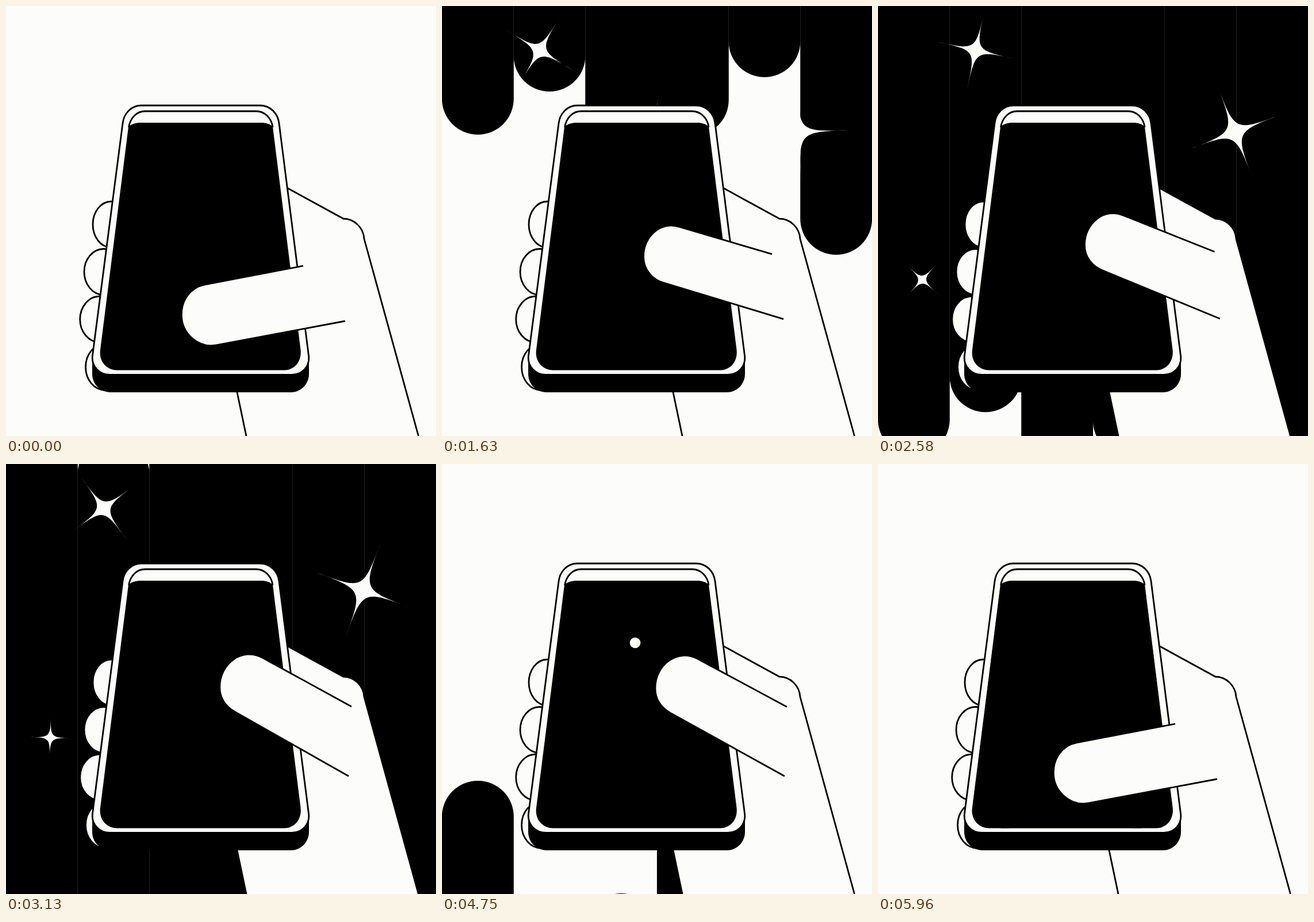
An HTML page for the animation above (6 s loop, 748 by 748 pixels).

```html
<!DOCTYPE html>
<html lang="en">
<head>
<meta charset="utf-8">
<title>Phone in hand</title>
<style>
  html, body { margin: 0; width: 100%; height: 100%; overflow: hidden; background: #fcfcfa; }
  svg { display: block; width: 100%; height: 100%; }
  .line { fill: none; stroke: #000; stroke-width: 2.8; }
  .paper { fill: #fcfcfa; }
  .skin { fill: #fcfcfa; stroke: #000; stroke-width: 2.8; }
</style>
</head>
<body>
<svg viewBox="0 0 748 748">
  <defs>
    <path id="screen" d="M213 210C219 205 226 203 234 203H444C452 203 459 205 464 210L512.5 598C515 620 500 633.5 484 633.5H193C177 633.5 161 620 164 598Z"/>
    <clipPath id="glass"><use href="#screen"/></clipPath>
  </defs>
  <rect class="paper" width="748" height="748"/>
  <g id="bars"></g>
  <g id="stars" class="paper"></g>

  <path class="skin" d="M480 311.5L587 370C606 370 622 386 623 405L720.8 760H420.5L399.5 660"/>
  <g class="skin">
    <ellipse cx="183" cy="380" rx="32" ry="40"/>
    <ellipse cx="170" cy="462.5" rx="34" ry="40"/>
    <ellipse cx="163" cy="545" rx="34.3" ry="40"/>
    <ellipse cx="172" cy="628" rx="33.5" ry="40"/>
  </g>

  <path d="M150 610V640C150 658 164 672 182 672H495C513 672 527 658 527 640V610Z"/>
  <path class="skin" d="M235 173H442C460 173 473 187 475 204L526.5 608C529 627 515 641.5 497 641.5H181C163 641.5 148 627 150.5 608L203 204C205 187 218 173 235 173Z"/>
  <use href="#screen"/>
  <g clip-path="url(#glass)">
    <circle id="ripple" class="paper" cx="336" cy="311"/>
    <circle id="rippleHole" cx="336" cy="311"/>
  </g>
  <path class="line" d="M213.5 211C216 195 227 183 242 183H435C450 183 462 195 464 211"/>
  <path id="thumb" class="skin"/>
</svg>
<script>
const LOOP = 6000;
const COLUMN = 748 / 6;
const TRAVEL = 1270;

// Resting top and bottom of each bar, before the shared travel is added.
const BARS = [
  [-457, 1058], [-132, 983], [-261, 1200],
  [-394, 1060], [-160, 958], [-244, 1267]
];

const STARS = [
  { x: 170, y: 77, size: 68, angle: t => -21.5 + 0.075 * (t - 2130) },
  { x: 621, y: 219, size: 87, angle: t => -54.6 + 0.075 * (t - 2130) },
  { x: 77, y: 476, size: 40, angle: t => 92 + 0.0813 * (t - 3130) - 1.418e-5 * (t - 3130) ** 2 }
];

// Thumb outline: start, two curves around the tip, end.
const THUMB_LOW = [517, 452, 345, 485, 321, 490, 305.3, 511, 305.3, 537, 305.3, 570, 335, 595.5, 366, 590, 590, 548];
const THUMB_HIGH = [601, 422, 446, 337, 411, 318, 371.8, 347, 371.8, 388, 371.8, 406, 381, 421, 398, 431, 596, 543];

const byId = id => document.getElementById(id);

function add(parent, tag, attrs) {
  const node = document.createElementNS("http://www.w3.org/2000/svg", tag);
  for (const key in attrs) node.setAttribute(key, attrs[key]);
  return byId(parent).appendChild(node);
}

const progress = (t, start, length) => Math.min(1, Math.max(0, (t - start) / length));
const smoother = s => s * s * s * (10 + s * (6 * s - 15));
const quadInOut = s => s < 0.5 ? 2 * s * s : 1 - 2 * (1 - s) ** 2;

function starPath(r) {
  return `M${r} 0C0 0 0 0 0 ${r}C0 0 0 0 ${-r} 0C0 0 0 0 0 ${-r}C0 0 0 0 ${r} 0Z`;
}

function thumbPath(lift) {
  const p = THUMB_LOW.map((v, i) => v + (THUMB_HIGH[i] - v) * lift);
  return `M${p.slice(0, 2)}L${p.slice(2, 4)}C${p.slice(4, 10)}C${p.slice(10, 16)}L${p.slice(16)}`;
}

const bars = BARS.map(([top, bottom], i) => add("bars", "rect", {
  x: i * COLUMN - 0.1, width: COLUMN + 0.2, height: bottom - top, rx: COLUMN / 2
}));
const stars = STARS.map(s => add("stars", "path", { d: starPath(s.size) }));
const thumb = byId("thumb");
const ripple = byId("ripple");
const rippleHole = byId("rippleHole");

function render(t) {
  const shift = -TRAVEL * Math.cos(Math.PI * t / LOOP);
  bars.forEach((bar, i) => bar.setAttribute("y", BARS[i][0] + shift));

  stars.forEach((star, i) => {
    const { x, y, angle } = STARS[i];
    star.setAttribute("transform", `translate(${x} ${y}) rotate(${angle(t)})`);
  });

  // Each swipe lasts two seconds: a long rise, then a quicker fall.
  const swipe = t % 2000;
  const lift = smoother(progress(swipe, 0, 850)) - smoother(progress(swipe, 1430, 500));
  thumb.setAttribute("d", thumbPath(lift));

  ripple.setAttribute("r", 340 * quadInOut(progress(t, 4675, 650)));
  rippleHole.setAttribute("r", 345 * quadInOut(progress(t, 4950, 650)));
}

const begin = performance.now();
function tick() {
  render((performance.now() - begin) % LOOP);
  requestAnimationFrame(tick);
}
tick();
</script>
</body>
</html>
```
